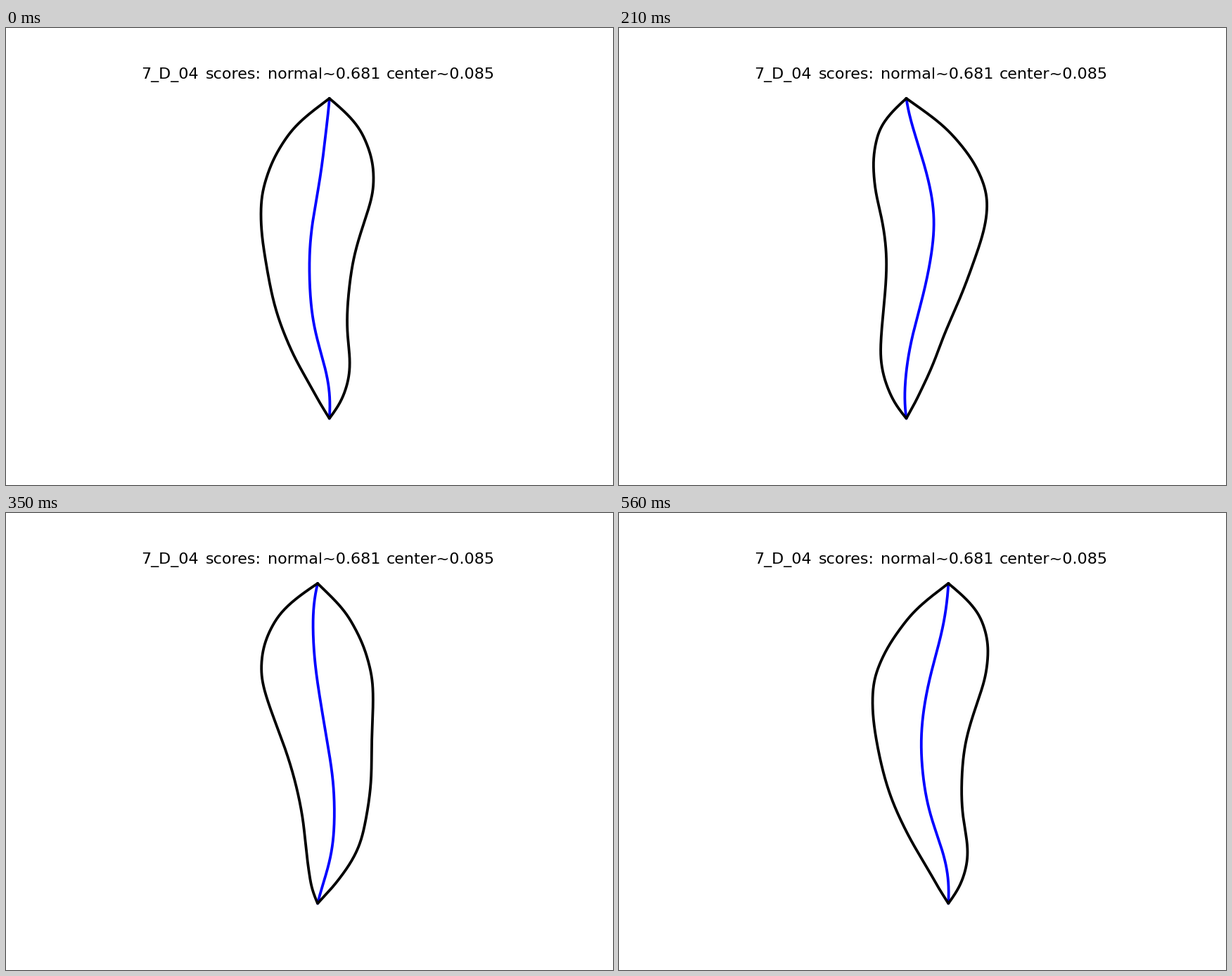
Recreate the animation shown at these times as a matplotlib script. Size 863 by 649 pixels, loop 630 ms.

```python
import numpy as np
import matplotlib.pyplot as plt
from matplotlib.animation import FuncAnimation

W, H, DPI = 863, 649, 64
FRAMES, STEP = 9, 70
TOP, BOTTOM = 100, 554.5
AXIS = 442.5
PT = 72 / DPI  # points per pixel

# Midline x at eight evenly spaced heights, for key times in steps
KEY_TIMES = [0, 2, 3, 5, 6, 8]
KEY_MIDS = np.array([
    [459.5, 453.5, 446.0, 436.5, 431.3, 432.8, 442.0, 456.5],
    [413.5, 428.5, 444.0, 445.0, 432.0, 414.0, 405.0, 407.0],
    [408.0, 422.0, 438.5, 447.0, 442.5, 430.5, 416.0, 407.0],
    [442.5, 436.0, 439.0, 447.0, 456.5, 464.5, 466.0, 458.5],
    [461.5, 448.5, 440.5, 441.5, 452.0, 467.0, 479.0, 479.5],
    [467.5, 460.5, 446.5, 434.0, 429.0, 433.0, 446.0, 463.5],
])

# Half width of the body along its height
WIDTH_Y = [100, 115, 130, 145, 160, 190, 210, 235, 262, 290, 327,
           384, 440, 470, 497, 514, 532, 554.5]
WIDTH_X = [0, 18.5, 35, 48, 57.5, 70.7, 75.6, 78, 75.6, 70.5, 63,
           53.5, 44, 38.4, 30.2, 23.2, 14.3, 0]

WORDS = [(192, "7_D_04"), (284, "scores:"),
         (372, "normal~0.681"), (540.5, "center~0.085")]


def spline(xk, yk, x):
    """Natural cubic spline through (xk, yk)."""
    xk, yk = np.array(xk, float), np.array(yk, float)
    h, n = np.diff(xk), len(xk)
    a, b = np.eye(n), np.zeros(n)
    slope = np.diff(yk) / h
    for i in range(1, n - 1):
        a[i, i - 1:i + 2] = h[i - 1], 2 * (h[i - 1] + h[i]), h[i]
        b[i] = 6 * (slope[i] - slope[i - 1])
    m = np.linalg.solve(a, b)
    i = np.clip(np.searchsorted(xk, x) - 1, 0, n - 2)
    l, r = xk[i + 1] - x, x - xk[i]
    return ((m[i] * l**3 + m[i + 1] * r**3) / (6 * h[i])
            + (yk[i] / h[i] - m[i] * h[i] / 6) * l
            + (yk[i + 1] / h[i] - m[i + 1] * h[i] / 6) * r)


def lagrange(t):
    """Weights of the key times at time t."""
    return np.array([np.prod([(t - q) / (p - q) for q in KEY_TIMES if q != p])
                     for p in KEY_TIMES])


y = np.linspace(TOP, BOTTOM, 300)
theta = 2 * np.pi * (y - TOP) / (BOTTOM - TOP)
half = spline(WIDTH_Y, WIDTH_X, y)
waves = np.exp(1j * np.outer(np.arange(5), theta))
gain = np.array([1, 2, 2, 2, 1]) / 8


def midline(t):
    """Wave running down the body, centred by its horizontal extent."""
    x = ((np.fft.rfft(lagrange(t) @ KEY_MIDS) * gain) @ waves).real
    return x + AXIS - ((x - half).min() + (x + half).max()) / 2


fig = plt.figure(figsize=(W / DPI, H / DPI), dpi=DPI, facecolor="white")
ax = fig.add_axes([0, 0, 1, 1])
ax.set_xlim(0, W)
ax.set_ylim(H, 0)
ax.axis("off")

for x, word in WORDS:
    ax.text(x, 72, word, family="DejaVu Sans", size=22.2 * PT,
            ha="left", va="baseline", color="black")

style = dict(lw=3.8 * PT, solid_joinstyle="round", solid_capstyle="round")
center, = ax.plot([], [], color="blue", **style)
outline, = ax.plot([], [], color="black", **style)


def draw(frame):
    x = midline(frame)
    center.set_data(x, y)
    outline.set_data(np.r_[x - half, (x + half)[::-1]], np.r_[y, y[::-1]])
    return center, outline


anim = FuncAnimation(fig, draw, frames=FRAMES, interval=STEP,
                     repeat=True, repeat_delay=0)
plt.show()
```
